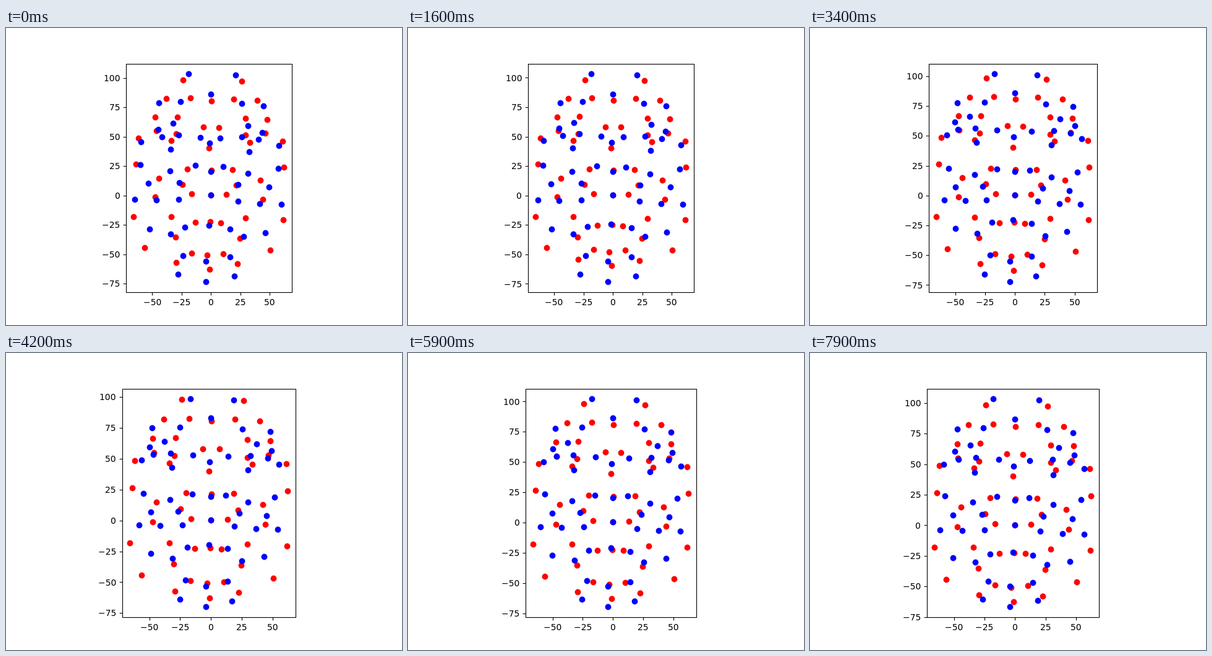
An HTML page with a canvas that plays this animation: 640x480 px, repeating every 8000 ms.

```html
<!DOCTYPE html>
<html lang="en">
<head>
<meta charset="utf-8">
<title>Face marker scatter plot</title>
<style>
  html, body { margin: 0; width: 100%; height: 100%; overflow: hidden; background: #fff; }
  canvas { display: block; }
</style>
</head>
<body>
<canvas id="plot" width="640" height="480"></canvas>
<script>
const ctx = document.getElementById('plot').getContext('2d');
const LOOP = 8000, STEP = 100;
const TOP = 57.6, BOTTOM = 427.2, CENTER = 328, MARGIN = 0.05;
const LINE = 1.11, TICK = 4.86, PAD = 9.72, DOT = 4.9;

// Each face is a half of mirrored markers plus the midline, in plot units.
// The mirror axis leans by `lean` around `shift`; `tilt` lowers the right side.
const redFace = {
  color: '#f00', shift: -1.4, lean: .03, tilt: .02,
  half: [
    [25.2, 97.6], [38.9, 81.3], [18.5, 82.2], [47.7, 65.5], [29, 66.1], [46.5, 53.7],
    [29.5, 51.6], [61.5, 47.1], [33.5, 45.8], [6.6, 57.9], [63, 25], [19.2, 21.9],
    [43.1, 13.6], [23.1, 8.8], [45.7, -2.5], [14.8, .8], [63.7, -19.5], [31.7, -19],
    [10.7, -23.3], [27.3, -36.1], [53.5, -45.8], [26, -58], [13.4, -49.5]],
  middle: [[.8, 80.4], [-1.2, 39.9], [.7, 21.2], [0, 0], [-.2, -22.6], [-2.8, -51.2], [-.7, -63]]
};
const blueFace = {
  color: '#00f', shift: -1.9, lean: .03, tilt: .03,
  half: [
    [17.9, 101.3], [48.5, 75.8], [25.7, 77.3], [50.3, 59.7], [37.9, 65.1], [47.2, 53.5],
    [33, 55.3], [56.6, 48.8], [14.5, 54], [31.4, 43.1], [54, 21], [32.2, 16.3],
    [13.7, 21.5], [47.7, 5.4], [25.1, 6.7], [57.1, -5.7], [39.4, -5.7], [21.5, -4.6],
    [46.7, -29.1], [28.4, -33], [16.6, -23.1], [17.4, -50.8], [21.5, -67]],
  middle: [[.3, 85.9], [-.8, 49.1], [.3, 20], [0, 0], [-1.3, -20.5], [-3.9, -55.3], [-3.9, -72.4]]
};

// Expression over time. frown: brows drawn in, nod: vertical scale,
// jaw: chin lift, press: lips pressed together.
const keys = [
  { t: 0, frown: 1, nod: 1, jaw: 0, press: 0 },
  { t: 600, frown: .95, nod: 1, jaw: 4, press: .4 },
  { t: 1600, frown: .85, nod: 1, jaw: 0, press: 1 },
  { t: 2300, frown: .5, nod: 1, jaw: 3, press: .6 },
  { t: 3400, frown: 0, nod: 1, jaw: 0, press: 0 },
  { t: 3900, frown: 0, nod: .975, jaw: 3, press: 0 },
  { t: 4200, frown: 0, nod: .967, jaw: 0, press: 0 },
  { t: 5200, frown: 0, nod: .992, jaw: 0, press: 0 },
  { t: 6700, frown: .3, nod: 1.01, jaw: 6, press: 0 },
  { t: LOOP, frown: .3, nod: 1.01, jaw: 6.7, press: 0 }
];

// How a full frown moves each height band: sideways (push + grow * x) and up.
const bands = [
  { above: 70, push: 5.5, grow: -.2, up: 1.5 },      // forehead
  { above: 50, push: -6, grow: 0, up: -5 },          // brows
  { above: 40, push: 2, grow: 0, up: -5 },           // eyes
  { above: 3, push: -4, grow: .16, up: 3.3 },        // nose and cheeks
  { above: -12, push: 3, grow: .04, up: 0 },         // nostrils
  { above: -27, push: 2.7, grow: 0, up: -5 },        // upper lip
  { above: -Infinity, push: 2.5, grow: 0, up: -1.2 } // chin
];

function expression(t) {
  const i = keys.findIndex(key => key.t > t);
  const a = keys[i - 1], b = keys[i], k = (t - a.t) / (b.t - a.t);
  return Object.fromEntries(Object.keys(a).map(name => [name, a[name] + (b[name] - a[name]) * k]));
}

// Red lips press together; the rest of the red face holds still.
function moveRed(x, y, { press }) {
  const upperLip = Math.abs(x) < 12 && y < -20 && y > -30;
  const lowerLip = Math.abs(x) < 30 && y < -45;
  return [x, y + press * (lowerLip ? 3.1 : upperLip ? -2.6 : 0)];
}

function moveBlue(x, y, { frown, nod, jaw }, onMidline) {
  const band = bands.find(({ above }) => y > above);
  const dx = onMidline ? 0 : band.push + band.grow * x;
  const dy = onMidline ? Math.min(band.up, 0) : band.up;
  const chin = Math.min(1, Math.max(0, (-y - 20) / 40));
  return [(x + frown * dx) * (1 + nod) / 2, (y + frown * dy) * nod + jaw * chin];
}

function pose(face, move, mood) {
  const points = face.middle.map(([x, y]) => move(x, y, mood, true));
  for (const [x0, y0] of face.half) {
    const [x, y] = move(x0, y0, mood, false);
    const axis = face.shift + face.lean * y;
    for (const side of [-1, 1]) points.push([axis + side * x, y - side * face.tilt * x]);
  }
  return points;
}

function limits(values) {
  const lo = Math.min(...values), hi = Math.max(...values);
  const pad = (hi - lo) * MARGIN;
  return [lo - pad, hi + pad];
}

const snap = v => Math.floor(v + .5) + .5;

function segment(x0, y0, x1, y1) {
  ctx.beginPath();
  ctx.moveTo(x0, y0);
  ctx.lineTo(x1, y1);
  ctx.stroke();
}

// Writes a tick value; align is the share of its width left of x.
function label(value, x, y, align) {
  const text = String(value).replace('-', '\u2212');
  ctx.fillText(text, Math.round(x - ctx.measureText(text).width * align), Math.round(y));
}

function draw(t) {
  const mood = expression(t);
  const layers = [
    [redFace.color, pose(redFace, moveRed, mood)],
    [blueFace.color, pose(blueFace, moveBlue, mood)]
  ];
  const all = layers.flatMap(([, points]) => points);
  const [xMin, xMax] = limits(all.map(p => p[0]));
  const [yMin, yMax] = limits(all.map(p => p[1]));
  const scale = (BOTTOM - TOP) / (yMax - yMin);
  const half = (xMax - xMin) * scale / 2;
  const left = CENTER - half, right = CENTER + half;
  const px = x => left + (x - xMin) * scale;
  const py = y => BOTTOM - (y - yMin) * scale;

  ctx.fillStyle = '#fff';
  ctx.fillRect(0, 0, 640, 480);

  for (const [color, points] of layers) {
    ctx.fillStyle = color;
    for (const [x, y] of points) {
      ctx.beginPath();
      ctx.arc(Math.floor(px(x)) + .5, Math.floor(py(y)) + .5, DOT, 0, 2 * Math.PI);
      ctx.fill();
    }
  }

  ctx.strokeStyle = ctx.fillStyle = '#000';
  ctx.lineWidth = LINE;
  ctx.font = '13.89px "DejaVu Sans", sans-serif';
  const l = snap(left), b = snap(BOTTOM);
  ctx.strokeRect(l, snap(TOP), snap(right) - l, b - snap(TOP));

  for (let v = -100; v <= 125; v += 25) {
    const x = px(v), y = py(v);
    if (x >= left - .5 && x <= right + .5) {
      segment(snap(x), b, snap(x), b + TICK);
      label(v, x, 448, .5);
    }
    if (y >= TOP - .5 && y <= BOTTOM + .5) {
      segment(l, snap(y), l - TICK, snap(y));
      label(v, left - PAD, y + 5.1, 1);
    }
  }
}

const start = performance.now();
function frame() {
  const t = (performance.now() - start) % LOOP;
  draw(Math.floor(t / STEP) * STEP);
  requestAnimationFrame(frame);
}
frame();
</script>
</body>
</html>
```
